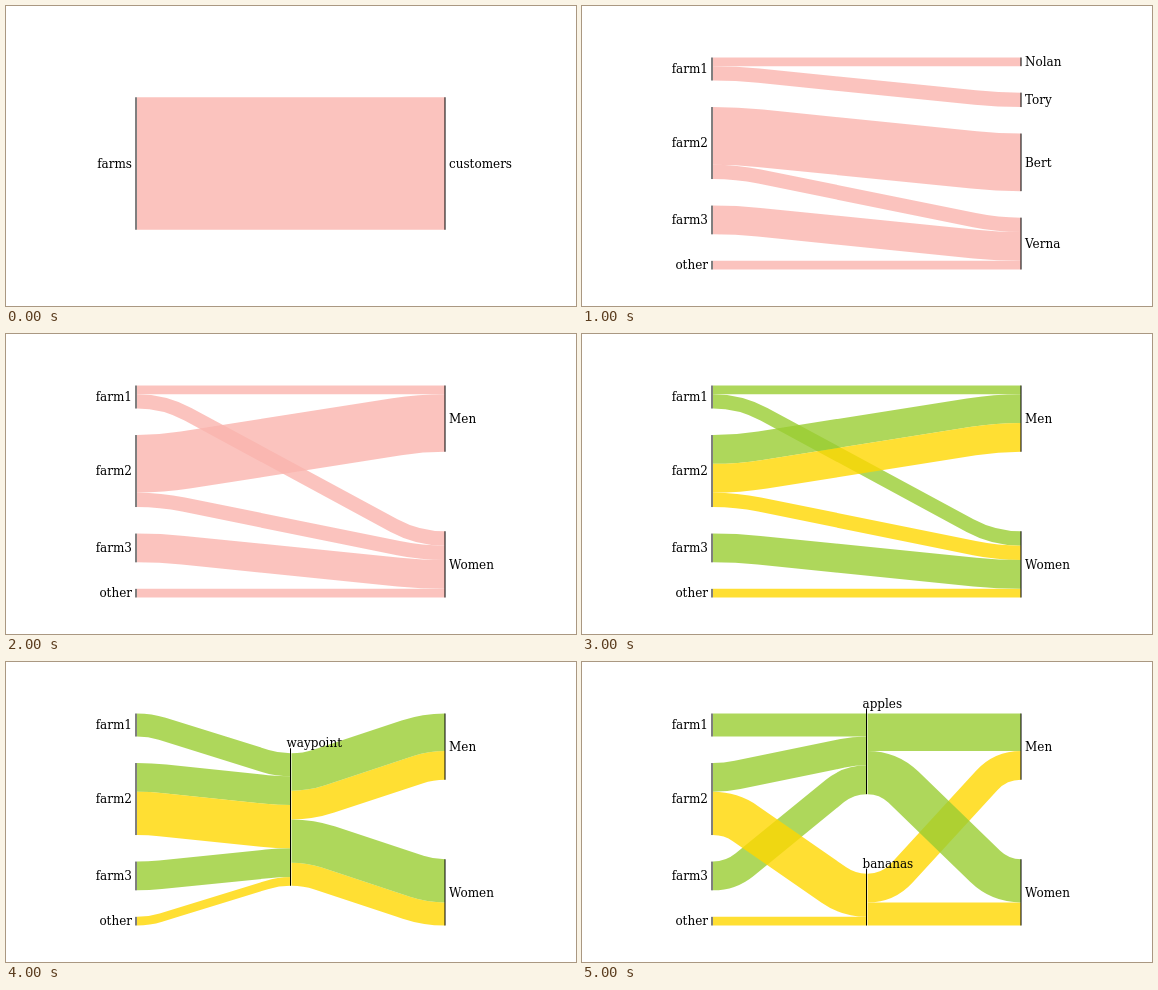
These frames come from a looping animation (570x300 px, 6000 ms). An HTML page:

```html
<!DOCTYPE html>
<html lang="en">
<head>
<meta charset="utf-8">
<title>Farms to customers</title>
<style>
  html, body { margin: 0; width: 100%; height: 100%; overflow: hidden; background: #fff; }
  svg { display: block; width: 570px; height: 300px; }
  text { font: 12px "DejaVu Serif", serif; fill: #000; }
  line { stroke: #000; stroke-width: 1; }
  path { fill-opacity: .8; }
</style>
</head>
<body>
<svg id="stage" viewBox="0 0 570 300"></svg>
<script>
const TOP = 51.5, HEIGHT = 212, LEFT = 130, RIGHT = 439, TOTAL = 46;
const UNIT = HEIGHT * 0.625 / TOTAL;
const STEP = 1000;
const PINK = '#fbb4ae', APPLE = 'yellowgreen', BANANA = 'gold';
const farms = ['farm1', 'farm2', 'farm3', 'other'];
const sexes = ['Men', 'Women'];

// Each view: node columns, then links as [from, to, value, colour], top to bottom.
const views = [
  { columns: [['farms'], ['customers']],
    links: [['farms', 'customers', 46, PINK]] },
  { columns: [farms, ['Nolan', 'Tory', 'Bert', 'Verna']],
    links: [
      ['farm1', 'Nolan', 3, PINK], ['farm1', 'Tory', 5, PINK],
      ['farm2', 'Bert', 20, PINK], ['farm2', 'Verna', 5, PINK],
      ['farm3', 'Verna', 10, PINK], ['other', 'Verna', 3, PINK]] },
  { columns: [farms, sexes],
    links: [
      ['farm1', 'Men', 3, PINK], ['farm1', 'Women', 5, PINK],
      ['farm2', 'Men', 20, PINK], ['farm2', 'Women', 5, PINK],
      ['farm3', 'Women', 10, PINK], ['other', 'Women', 3, PINK]] },
  { columns: [farms, sexes],
    links: [
      ['farm1', 'Men', 3, APPLE], ['farm1', 'Women', 5, APPLE],
      ['farm2', 'Men', 10, APPLE], ['farm2', 'Men', 10, BANANA],
      ['farm2', 'Women', 5, BANANA],
      ['farm3', 'Women', 10, APPLE], ['other', 'Women', 3, BANANA]] },
  { columns: [farms, ['waypoint'], sexes],
    links: [
      ['farm1', 'waypoint', 8, APPLE], ['farm2', 'waypoint', 10, APPLE],
      ['farm2', 'waypoint', 15, BANANA],
      ['farm3', 'waypoint', 10, APPLE], ['other', 'waypoint', 3, BANANA],
      ['waypoint', 'Men', 13, APPLE], ['waypoint', 'Men', 10, BANANA],
      ['waypoint', 'Women', 15, APPLE], ['waypoint', 'Women', 8, BANANA]] },
  { columns: [farms, ['apples', 'bananas'], sexes],
    links: [
      ['farm1', 'apples', 8, APPLE], ['farm2', 'apples', 10, APPLE],
      ['farm2', 'bananas', 15, BANANA],
      ['farm3', 'apples', 10, APPLE], ['other', 'bananas', 3, BANANA],
      ['apples', 'Men', 13, APPLE], ['bananas', 'Men', 10, BANANA],
      ['apples', 'Women', 15, APPLE], ['bananas', 'Women', 8, BANANA]] }
];

function placeNodes({ columns, links }) {
  const nodes = {};
  const sum = (name, end) =>
    links.reduce((s, l) => s + (l[end] === name ? l[2] : 0), 0);
  columns.forEach((names, c) => {
    const spare = HEIGHT - TOTAL * UNIT;
    const gap = names.length > 1 ? spare / (names.length - 1) : 0;
    let y = names.length > 1 ? TOP : TOP + spare / 2;
    for (const name of names) {
      const h = Math.max(sum(name, 0), sum(name, 1)) * UNIT;
      const side = c === 0 ? 'left' : c === columns.length - 1 ? 'right' : 'mid';
      const x = LEFT + (RIGHT - LEFT) * c / (columns.length - 1);
      nodes[name] = { name, side, x, y, h, out: y, in: y };
      y += h + gap;
    }
  });
  return nodes;
}

function placeLinks(links, nodes) {
  return links.map(([from, to, value, color]) => {
    const a = nodes[from], b = nodes[to], w = value * UNIT, h = w / 2;
    const l = { from, to, color, h, x0: a.x + 1, x1: b.x, y0: a.out + h, y1: b.in + h };
    a.out += w;
    b.in += w;
    const dx = l.x1 - l.x0, dy = l.y1 - l.y0;
    l.dir = Math.abs(dy) < 0.01 ? 0 : Math.sign(dy);
    if (l.dir) {
      l.rMax = (dx * dx + dy * dy) / Math.abs(4 * dy);
      l.r0 = l.r1 = Math.max(h, (h + l.rMax) / 2);
    }
    return l;
  });
}

// Widen outer bends so that neighbours turning together do not overlap.
function nestBends(links, nodes) {
  for (const name in nodes) for (const [end, r] of [['from', 'r0'], ['to', 'r1']])
    for (const dir of [1, -1]) {
      const group = links.filter(l => l[end] === name && l.dir === dir);
      if ((end === 'from') === (dir > 0)) group.reverse();
      let inner = 0;
      for (const l of group) {
        if (l[r] - l.h < inner) l[r] = Math.min(l.rMax, inner + l.h);
        inner = l[r] + l.h;
      }
    }
}

function linkPath({ x0, x1, y0, y1, h, dir, r0, r1 }) {
  if (!dir) return `M${x0},${y0 - h}H${x1}V${y1 + h}H${x0}Z`;
  const dx = x1 - x0, dy = Math.abs(y1 - y0) - r0 - r1;
  const angle = Math.PI / 2 + Math.atan2(dy, dx)
    - Math.acos(Math.min(1, (r0 + r1) / Math.hypot(dx, dy)));
  const sin = Math.sin(angle), drop = 1 - Math.cos(angle), k = dir * h;
  const start = (r, e) => `${x0 + r * sin},${y0 + e + dir * r * drop}`;
  const stop = (r, e) => `${x1 - r * sin},${y1 + e - dir * r * drop}`;
  const arc = (r, bend, p) => `A${r},${r} 0 0 ${bend === dir ? 1 : 0} ${p}`;
  return `M${x0},${y0 - k}` + arc(r0 + h, 1, start(r0 + h, -k))
    + 'L' + stop(r1 - h, -k) + arc(r1 - h, -1, `${x1},${y1 - k}`)
    + `L${x1},${y1 + k}` + arc(r1 + h, 1, stop(r1 + h, k))
    + 'L' + start(r0 - h, k) + arc(r0 - h, -1, `${x0},${y0 + k}`) + 'Z';
}

function nodeMarkup({ name, side, x, y, h }) {
  const mid = side === 'mid';
  const tx = side === 'right' ? x + 4 : x - 4;
  const ty = mid ? y - 10 : y + h / 2;
  return `<line x1="${x}" x2="${x}" y1="${mid ? y - 5 : y}" y2="${y + h}"/>`
    + `<text x="${tx}" y="${ty}" dy=".35em" text-anchor="${side === 'left' ? 'end' : 'start'}">${name}</text>`;
}

function viewMarkup(view) {
  const nodes = placeNodes(view), links = placeLinks(view.links, nodes);
  nestBends(links, nodes);
  links.sort((a, b) => a.h - b.h);
  return links.map(l => `<path d="${linkPath(l)}" fill="${l.color}"/>`).join('')
    + Object.values(nodes).map(nodeMarkup).join('');
}

const stage = document.getElementById('stage');
const pages = views.map(viewMarkup);
const begin = performance.now();
let shown = -1;

function draw() {
  const i = Math.floor((performance.now() - begin) / STEP) % pages.length;
  if (i !== shown) stage.innerHTML = pages[shown = i];
  requestAnimationFrame(draw);
}
draw();
</script>
</body>
</html>
```
